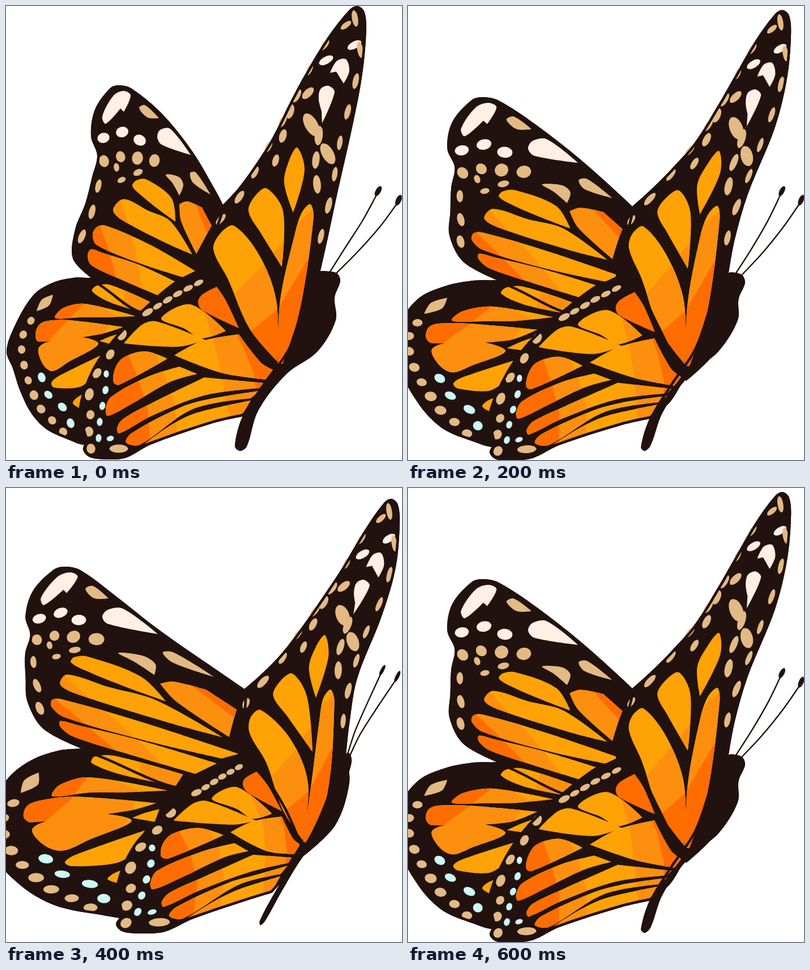
Write an HTML page with a canvas that moves like this. It is 699 px wide and 802 px high and loops after 800 ms.

```html
<!DOCTYPE html>
<html lang="en">
<head>
<meta charset="utf-8">
<title>Butterfly</title>
<style>
html, body { margin: 0; width: 100%; height: 100%; overflow: hidden; background: #fff; }
canvas { display: block; width: 699px; height: 802px; }
</style>
</head>
<body>
<canvas id="stage" width="699" height="802"></canvas>
<script>
const ctx = document.getElementById('stage').getContext('2d');
const INK = '#21120f', LIGHT = '#ffa206', MID = '#fd8f0e', DARK = '#ff6d00';
const TAN = '#e3ba84', PALE = '#ffefe4', CYAN = '#cdf8f5';

// Everything is drawn with the wings raised. In a path "x,y" is a smooth point
// and "x,y!" a corner. A pin lists one landmark raised, half way and lowered.
const shape = (color, ...paths) => ({ color, paths });
const row = (color, count, across, along, curve) => ({ color, count, across, along, curve });

const farFore = {
  pins: ['200,140 132,161 105,139', '172,233 95,255 59,231', '326,263 300,277 268,258',
    '383,351 396,354 421,355', '262,273 204,293 159,267', '225,318 163,337 117,308',
    '133,408 92,417 59,390', '336,438 361,447 394,440', '150,480 157,484 133,460'],
  edge: `200,140 222,146 276,191 329,257 371,328 383,351! 390,420 345,495 250,545 165,495
    150,480! 118,446 122,395 140,349 152,302 161,264 150,230 157,183 184,145`,
  cells: [
    '223,318 230,308 247,306 292,339 299,381! 270,360 238,334',
    '189,360 208,341 250,361 290,380 329,439! 285,420 203,377',
    '153,403 161,390 176,388 255,422 334,468! 312,479! 240,456 160,422',
    '144,441 150,430 170,436 235,457 303,489! 270,512! 205,484 151,458'
  ],
  bands: [
    shape(MID, '100,340! 199,335! 214,378! 228,430! 245,520! 100,520!'),
    shape(DARK, '100,370! 160,375! 178,420! 200,500! 100,500!')
  ],
  marks: [
    shape(MID, '306,350! 320,345 346,356! 363,388! 350,412 336,438! 309,380'),
    shape(DARK, '335,351! 346,356! 363,388! 355,402!'),
    shape(PALE, '170,195 190,158 208,150 220,158 208,187! 202,181! 176,208',
      '267,232 272,219 290,217 326,263! 275,245'),
    row(PALE, 3, 10, 12, '172,233 207,222 236,237'),
    shape(TAN, '235,180 245,175 270,198! 250,197', '325,295 335,294 361,333! 330,312',
      '282,298 305,302 313,316 306,335! 294,313'),
    row(TAN, 4, 11, 9, '173,274 207,265 262,273'),
    row(TAN, 3, 5, 8, '195,285 198,310 233,294'),
    row(TAN, 3, 5, 12, '163,318 151,367 134,407')
  ]
};

const farHind = {
  pins: ['150,480 157,484 133,460', '53,538 27,543 24,538', '138,526 150,531 146,511',
    '52,578 31,580 30,576', '205,570 226,575 264,560', '163,597 172,610 222,588',
    '80,667 80,668 104,662', '35,648 17,652 18,654', '107,713 118,718 162,703',
    '101,752 104,755 149,741'],
  edge: `150,480 120,480 82,489 48,511 15,566 1,610 12,640 25,680 45,720 72,748
    115,768 135,775 160,775! 200,640 300,600! 345,490! 250,470`,
  cells: [
    '152,504 160,494 185,493 257,524! 242,541! 185,524',
    '87,551 100,534 138,526 229,548! 175,550 130,550',
    '52,583 57,565 70,557 110,555 207,567! 165,580 58,593',
    '57,606 72,594 130,585 163,597 110,629 82,645 66,634',
    '80,666 91,655 174,614! 154,656! 130,673 85,674',
    '118,702 125,692 141,683! 133,712!',
    '165,592! 183,584 207,577! 192,599!'
  ],
  bands: [
    shape(MID, '30,505! 145,515! 195,548! 150,610! 70,655! 30,650!', '215,490! 280,500! 260,560! 200,540!'),
    shape(DARK, '40,510! 145,518! 105,560! 72,594! 40,600!')
  ],
  marks: [
    shape(TAN, '83,510! 76,529 54,539! 63,519'),
    row(TAN, 9, 7, 8, '44,556 25,590 34,648 57,707 101,752'),
    row(CYAN, 4, 6, 8, '63,656 74,686 107,715 114,737')
  ]
};

const nearFore = {
  pins: ['620,1 661,8 680,20', '565,172 608,178 626,192', '568,261 598,265 612,271',
    '514,250 549,256 563,260', '433,307 455,311 481,313', '383,351 396,354 421,355',
    '537,350 546,353 573,356', '487,460 494,463 541,465', '366,430 390,428 430,433',
    '479,630 488,634 524,624', '555,465 566,468 600,468'],
  edge: `620,0 632,9 636,40 629,120 612,210 585,330 568,410 555,468! 562,520 540,600 483,658!
    400,580 342,490 350,425 372,385 383,351! 409,323 437,285 469,235 504,165 529,119 568,55 606,7`,
  cells: [
    '514,250 527,290 507,365! 491,312 500,272',
    '428,362 440,335 460,322 489,362 487,461! 449,400',
    '366,430 378,402 402,388 447,440 477,520 479,628! 430,570 392,483',
    '510,402 522,365 537,350 543,372 518,540 488,632! 480,631! 484,520'
  ],
  bands: [
    shape(MID, '580,330! 525,372! 455,456! 385,528! 450,650! 520,650! 580,400!'),
    shape(DARK, '570,395! 530,452! 480,535! 420,585! 450,650! 520,650!')
  ],
  marks: [
    shape(PALE, '572,118! 584,97 600,94 606,115 596,137! 583,116!',
      '552,165 555,147 569,141 580,152 558,207! 557,185!'),
    row(PALE, 2, 7, 15, '615,69 565,96'),
    row(TAN, 9, 5, 12, '600,34 575,53 547,89 515,156 456,262 433,307 407,345 379,377'),
    row(TAN, 4, 6, 12, '533,154 502,185 488,232 476,273'),
    row(TAN, 8, 5, 14, '616,22 627,88 617,134 590,237 575,330 556,407'),
    row(TAN, 2, 11, 22, '539,210 568,261'),
    row(TAN, 3, 7, 17, '552,229 546,281 549,315')
  ]
};

const nearHind = {
  pins: ['340,489 368,499 411,493', '205,581 228,587 291,574', '154,658 173,666 229,643',
    '176,712 191,718 255,697', '184,764 196,766 258,749', '411,569 436,576 487,571',
    '297,617 321,630 396,608', '472,645 482,657 519,631', '418,724 428,728 470,714',
    '137,785 145,790 195,772'],
  edge: `352,474 325,475 295,489 235,541 185,593 148,650 128,718 140,767 136,784 148,797
    180,801 212,798 255,775 365,737 418,725! 455,690 478,645! 420,560 380,490`,
  cells: [
    '274,552 325,527 388,574! 345,587 315,570',
    '208,596! 240,563 265,557 352,590! 303,602',
    '190,665 192,642 206,622 245,610 285,623! 200,669',
    '297,617! 345,592 411,580! 450,630 472,643! 460,660! 380,648',
    '176,712 185,691 250,655 306,637! 338,650! 290,664 225,701 180,724',
    '196,746 206,730 260,700 350,656! 455,666! 447,675! 350,688 255,725 200,755',
    '212,771 221,755 310,708 360,694 447,680! 432,693! 330,712 236,775',
    '245,773! 290,741 335,719 432,697! 418,720! 310,750!'
  ],
  bands: [
    shape(MID, '160,605! 260,605! 280,650! 297,700! 305,790! 160,790!',
      '348,535! 367,595! 380,650! 397,740! 500,720! 500,560! 400,540!'),
    shape(DARK, '160,605! 212,605! 232,655! 250,710! 256,790! 160,790!',
      '398,565! 418,600! 438,650! 445,730! 500,720! 500,570!')
  ],
  marks: [
    shape(DARK, '339,523 346,510 372,496! 388,520 411,569! 346,537'),
    row(TAN, 6, 5, 10, '340,489 302,509 250,541'),
    row(TAN, 4, 7, 10, '205,581 180,622 154,658 147,686'),
    row(TAN, 3, 7, 8, '149,722 145,740 150,782'),
    row(TAN, 1, 7, 16, '199,782 215,782'),
    row(CYAN, 6, 5, 7, '177,650 177,672 166,727 163,770 184,764')
  ]
};

const body = {
  pins: ['586,474 592,478 609,474', '582,555 582,555 599,543', '495,650 497,652 525,650',
    '445,715 450,717 488,710', '425,780 428,778 457,766', '405,778 412,780 448,766',
    '555,465 566,468 600,468', '571,470 578,472 603,468', '620,435 625,437 624,437',
    '657,327 660,327 664,322', '693,343 694,343 691,333'],
  edge: `572,469 585,473 590,486 580,515 582,555 550,610 495,650 445,715 425,778 413,786
    404,777 418,724 455,665 500,600 530,500 552,470`,
  lines: ['571,471 600,425 630,378 655,332', '581,474 620,435 660,390 691,348'],
  marks: [row(INK, 1, 5, 11, '657,327 664,315'), row(INK, 1, 5, 11, '693,343 698,332')]
};

const points = text => text.trim().split(/\s+/).map(s => {
  const p = s.replace('!', '').split(',').map(Number);
  p.corner = s.endsWith('!');
  return p;
});
const dist = (a, b) => Math.hypot(b[0] - a[0], b[1] - a[1]);

function seeded(seed) {
  return () => (seed = seed * 16807 % 2147483647) / 2147483647;
}

function solve(m) {
  const n = m.length;
  for (let c = 0; c < n; c++) {
    let p = c;
    for (let r = c + 1; r < n; r++) if (Math.abs(m[r][c]) > Math.abs(m[p][c])) p = r;
    [m[c], m[p]] = [m[p], m[c]];
    for (let r = 0; r < n; r++) {
      if (r === c) continue;
      const f = m[r][c] / m[c][c];
      for (let k = c; k < m[c].length; k++) m[r][k] -= f * m[c][k];
    }
  }
  return m.map((line, i) => [line[n] / line[i], line[n + 1] / line[i]]);
}

// Thin-plate warp that carries the pins from the raised pose to another.
function makeWarp(pins, pose) {
  if (!pose) return p => p;
  const base = pins.map(p => [p[0][0] / 100, p[0][1] / 100]);
  const bend = (a, b) => {
    const d = dist(a, b) ** 2;
    return d ? d * Math.log(d) : 0;
  };
  const m = base.map((a, i) => [
    ...base.map((b, j) => i === j ? 0.01 : bend(a, b)),
    1, ...a, pins[i][pose][0], pins[i][pose][1]
  ]);
  for (let k = 0; k < 3; k++) m.push([...base.map(b => k ? b[k - 1] : 1), 0, 0, 0, 0, 0]);
  const w = solve(m);
  return ([x, y]) => {
    const q = [x / 100, y / 100];
    const basis = [...base.map(b => bend(q, b)), 1, ...q];
    return [0, 1].map(k => basis.reduce((s, v, i) => s + v * w[i][k], 0));
  };
}

function trace(path, pts, closed = true) {
  const n = pts.length;
  const at = i => pts[closed ? (i + n) % n : Math.max(0, Math.min(n - 1, i))];
  const handle = (a, p, b, toward) => {
    if (p.corner) return p;
    const k = dist(p, toward) / (dist(a, p) + dist(p, b) || 1) / 3 * (toward === b ? 1 : -1);
    return [p[0] + (b[0] - a[0]) * k, p[1] + (b[1] - a[1]) * k];
  };
  path.moveTo(pts[0][0], pts[0][1]);
  for (let i = 0; i < (closed ? n : n - 1); i++) {
    const a = at(i - 1), p = at(i), q = at(i + 1), b = at(i + 2);
    const h = handle(a, p, q, q), g = handle(p, q, b, p);
    path.bezierCurveTo(h[0], h[1], g[0], g[1], q[0], q[1]);
  }
  if (closed) path.closePath();
}

// Point and direction at a share of a polyline's length.
function along(pts, share) {
  const steps = pts.slice(1).map((p, i) => dist(pts[i], p));
  let left = share * steps.reduce((a, b) => a + b), i = 0;
  while (i < steps.length - 1 && left > steps[i]) left -= steps[i++];
  const [a, b] = [pts[i], pts[i + 1]], k = left / steps[i];
  return {
    x: a[0] + (b[0] - a[0]) * k, y: a[1] + (b[1] - a[1]) * k,
    ux: (b[0] - a[0]) / steps[i], uy: (b[1] - a[1]) / steps[i]
  };
}

function build(part, pose) {
  const warp = makeWarp(part.pins.map(points), pose);
  const rand = seeded(77);
  const add = (path, pts, closed) =>
    trace(path, pts.map(p => Object.assign(warp(p), { corner: p.corner })), closed);
  const join = (paths = [], closed = true) => {
    const path = new Path2D();
    paths.forEach(s => add(path, points(s), closed));
    return path;
  };
  const spots = ({ count, across, along: tall, curve }) => {
    const path = new Path2D(), pts = points(curve);
    for (let i = 0; i < count; i++) {
      const { x, y, ux, uy } = along(pts, count > 1 ? i / (count - 1) : 0);
      const size = 0.9 + 0.2 * rand();
      add(path, Array.from({ length: 8 }, (_, j) => {
        const u = tall * size * Math.cos(j * Math.PI / 4);
        const v = across * size * Math.sin(j * Math.PI / 4);
        return [x + ux * u - uy * v, y + uy * u + ux * v];
      }));
    }
    return path;
  };
  const paint = item => [item.color, item.paths ? join(item.paths) : spots(item)];
  return {
    edge: join([part.edge]),
    cells: join(part.cells),
    lines: join(part.lines, false),
    bands: (part.bands || []).map(paint),
    marks: part.marks.map(paint)
  };
}

function fill(color, path) {
  ctx.fillStyle = color;
  ctx.fill(path);
}

function inside(path, draw) {
  ctx.save();
  ctx.clip(path);
  draw();
  ctx.restore();
}

function stroke(path, width) {
  ctx.strokeStyle = INK;
  ctx.lineWidth = width;
  ctx.stroke(path);
}

function drawLayer(layer) {
  layer.forEach(p => fill(INK, p.edge));
  for (const p of layer) {
    fill(LIGHT, p.cells);
    inside(p.cells, () => p.bands.forEach(b => fill(...b)));
    p.marks.forEach(m => fill(...m));
    inside(p.edge, () => stroke(p.edge, 9));
    stroke(p.lines, 2.4);
  }
}

const layers = [[farHind, farFore], [nearFore, nearHind, body]];
const poses = [0, 1, 2].map(pose => layers.map(layer => layer.map(part => build(part, pose))));
const beat = [0, 1, 2, 1];

function frame() {
  const step = Math.floor(performance.now() / 200) % beat.length;
  ctx.fillStyle = '#fff';
  ctx.fillRect(0, 0, 699, 802);
  poses[beat[step]].forEach(drawLayer);
  requestAnimationFrame(frame);
}
frame();
</script>
</body>
</html>
```
